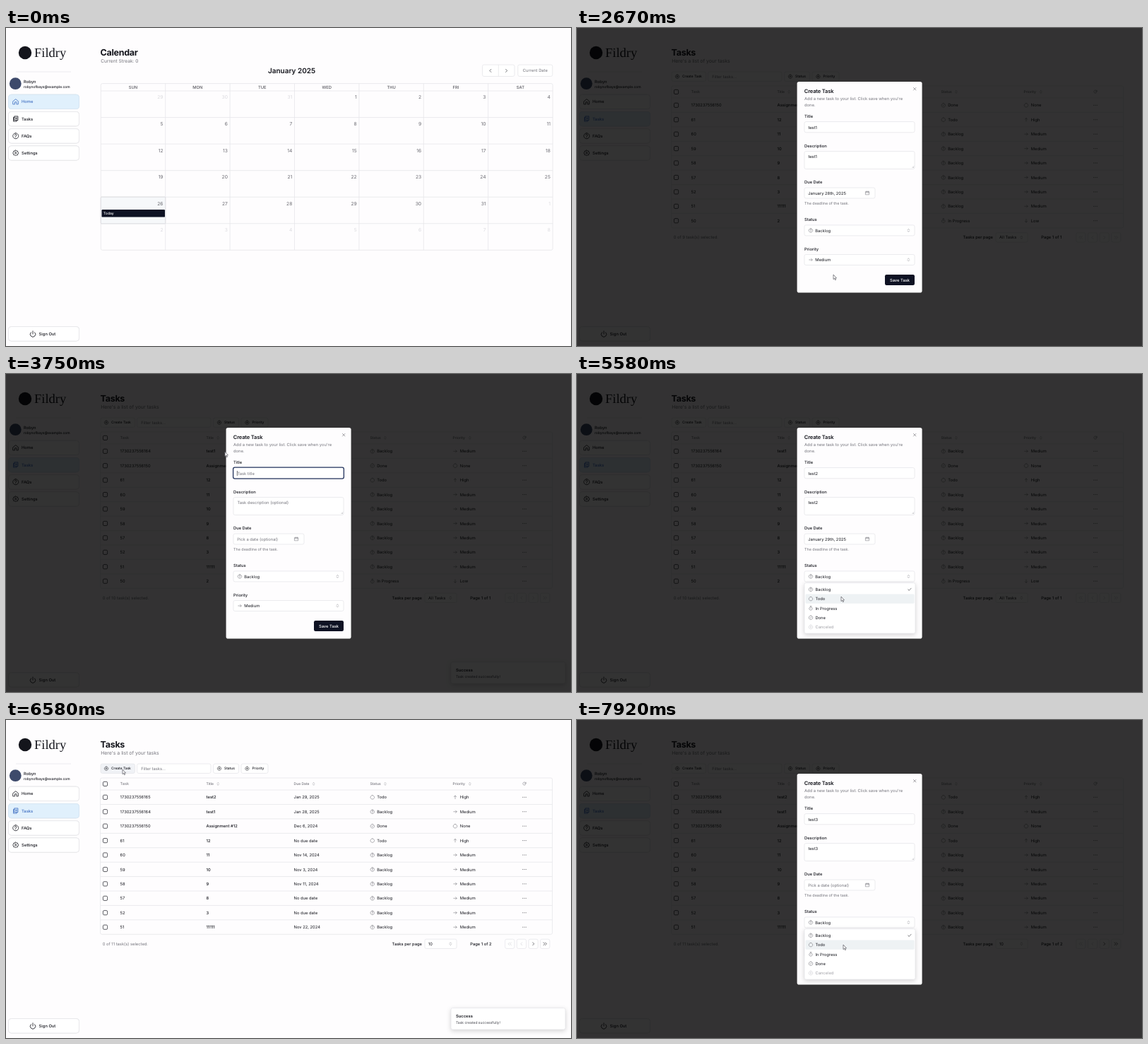
An HTML page that plays this animation: 800 by 450 pixels, repeating every 8 s.

```html
<!DOCTYPE html>
<html lang="en">
<head>
<meta charset="utf-8">
<title>Task manager demo</title>
<style>
html, body { margin: 0; width: 100%; height: 100%; overflow: hidden; background: #fefdfe; }
svg { display: block; width: 800px; height: 450px; font-family: Inter, Arial, sans-serif; text-rendering: geometricPrecision; }
.lift { filter: drop-shadow(0 .6px .7px rgba(0,0,0,.14)); }
.float { filter: drop-shadow(0 2px 3px rgba(0,0,0,.16)); }
</style>
</head>
<body>
<svg id="stage" viewBox="0 0 800 450"></svg>
<script>
const INK = '#14151c', GREY = '#74747c', PALE = '#c9c9ce', LINE = '#e6e6ea', NAVY = '#0e1223', BONE = '#e5e4e7';
const STEP = 1000 / 12, STEPS = 96;
const RING = 'M12 2a10 10 0 1 0 .01 0';
const ICON = {
  home: 'M3 10l9-7 9 7v11h-6v-8H9v8H3z',
  tasks: 'M8 3h12v14H8zM8 7H4v14h12v-4M11 8h6M11 12h6',
  help: RING + 'M9 9a3 3 0 1 1 4 3c-1 .5-1 1-1 2M12 17h.01',
  gear: 'M12 2l3 3h4l1 4 2 3-2 3-1 4h-4l-3 3-3-3H5l-1-4-2-3 2-3 1-4h4zM12 9a3 3 0 1 0 .01 0',
  power: 'M12 2v10M18.4 6.6a9 9 0 1 1-12.8 0',
  plus: RING + 'M8 12h8M12 8v8',
  sort: 'M7 15l5 5 5-5M7 9l5-5 5 5',
  refresh: 'M20 11a8 8 0 1 0-2 6M20 4v7h-7',
  dots: 'M4 12h.01M12 12h.01M20 12h.01',
  date: 'M3 5h18v16H3zM3 10h18M8 2v5M16 2v5',
  close: 'M5 5l14 14M19 5L5 19',
  check: 'M4 12l5 6L20 6',
  prev: 'M15 5l-7 7 7 7', next: 'M9 5l7 7-7 7',
  first: 'M11 5l-7 7 7 7M20 5l-7 7 7 7', last: 'M4 5l7 7-7 7M13 5l7 7-7 7',
  Backlog: RING + 'M9 9a3 3 0 1 1 4 3c-1 .5-1 1-1 2M12 17h.01',
  Todo: RING,
  'In Progress': 'M12 5a8.5 8.5 0 1 0 .01 0M12 14v-4M9 1h6',
  Done: RING + 'M8 12l3 3 5-6',
  Canceled: RING + 'M9 9l6 6M15 9l-6 6',
  None: RING, Low: 'M12 4v16M6 14l6 6 6-6', Medium: 'M4 12h16M14 6l6 6-6 6', High: 'M12 20V4M6 10l6-6 6 6'
};
const STATUSES = ['Backlog', 'Todo', 'In Progress', 'Done', 'Canceled'];
const PRIORITIES = ['None', 'Low', 'Medium', 'High'];
const TASKS = [
  ['1730237556165', 'test2', 'Jan 29, 2025', 'Todo', 'High'],
  ['1730237556164', 'test1', 'Jan 28, 2025', 'Backlog', 'Medium'],
  ['1730237556150', 'Assignment #12', 'Dec 6, 2024', 'Done', 'None'],
  ['61', '12', '', 'Todo', 'High'],
  ['60', '11', 'Nov 14, 2024', 'Backlog', 'Medium'],
  ['59', '10', 'Nov 3, 2024', 'Backlog', 'Medium'],
  ['58', '9', 'Nov 11, 2024', 'Backlog', 'Medium'],
  ['57', '8', '', 'Backlog', 'Medium'],
  ['52', '3', '', 'Backlog', 'Medium'],
  ['51', '11111', 'Nov 22, 2024', 'Backlog', 'Medium'],
  ['50', '2', '', 'In Progress', 'Low']
];
// All times below are in steps of 1/12 s.
const FORMS = [
  { open: 14, title: 15, desc: 20, cal: [29, 32], day: 28, close: 36, text: 'test1' },
  { open: 44, title: 46, desc: 51, cal: [59, 63], day: 29, status: [66, 68], prio: [70, 73], close: 75, text: 'test2' },
  { open: 80, title: 83, desc: 88, status: [94, 99], close: 96, text: 'test3' }
];
const PATH = [
  [4, 20, 220], [6, 45, 145], [7, 42, 126], [9, 60, 126], [13, 160, 68], [14, 361, 100], [23, 361, 100],
  [24, 414, 101], [25, 414, 101], [28, 395, 231], [29, 395, 231], [31, 363, 349], [32, 363, 349], [35, 455, 355],
  [36, 455, 355], [41, 333, 208], [43, 163, 69], [44, 163, 69], [45, 310, 110], [55, 310, 110], [58, 395, 231],
  [59, 395, 231], [62, 378, 349], [63, 378, 349], [65, 420, 284], [66, 420, 284], [67, 374, 315], [68, 374, 315],
  [70, 420, 326], [72, 365, 383], [73, 365, 383], [74, 455, 355], [75, 455, 355], [79, 165, 70], [80, 165, 70],
  [83, 330, 116], [91, 330, 116], [93, 420, 284], [94, 420, 284], [95, 377, 318]
];

const within = (k, span) => span && k >= span[0] && k < span[1];
const loop = (n, fn) => Array.from({ length: n }, (_, i) => fn(i)).join('');

// y is the middle of the capitals
function text(x, y, str, size = 5.8, fill = INK, weight = 400, anchor = 'start', extra = '') {
  return `<text x="${x}" y="${y + size * .364}" font-size="${size}" fill="${fill}" font-weight="${weight}" text-anchor="${anchor}" ${extra}>${str}</text>`;
}
function box(x, y, w, h, fill = 'none', stroke = 'none', r = 2.2, extra = '') {
  return `<rect x="${x}" y="${y}" width="${w}" height="${h}" rx="${r}" fill="${fill}" stroke="${stroke}" stroke-width=".8" ${extra}/>`;
}
function icon(name, x, y, size = 6.7, color = INK, width = 2) {
  const s = size / 24;
  return `<path d="${ICON[name]}" transform="translate(${x - size / 2} ${y - size / 2}) scale(${s})" fill="none" stroke="${color}" stroke-width="${width}" stroke-linecap="round" stroke-linejoin="round"/>`;
}
const line = (x1, y1, x2, y2) => `<path d="M${x1} ${y1}L${x2} ${y2}" stroke="${LINE}" stroke-width=".8"/>`;
const heading = (title, sub, size) =>
  text(133.6, 34.5, title, 12.5, INK, 700, 'start', 'letter-spacing="-.3"') + text(134.2, 46.8, sub, size, GREY);

function sidebar(active) {
  const items = [['Home', 'home'], ['Tasks', 'tasks'], ['FAQs', 'help'], ['Settings', 'gear']];
  return `<circle cx="27" cy="35" r="9.2" fill="${INK}"/>` +
    `<text x="40" y="41" font-size="18.5" fill="${INK}" font-family="Liberation Serif, Times New Roman, serif">Fildry</text>` +
    line(14, 62, 92, 62) + '<circle cx="13.3" cy="78.7" r="8.4" fill="#3d4a6b"/>' +
    text(25, 75.4, 'Robyn', 5.8, INK, 500) + text(25, 83, 'robynofbays@example.com', 4.9, INK, 500) +
    items.map(([label, name], i) => {
      const on = label === active, y = 94.2 + 24.2 * i, color = on ? '#3c6cc0' : INK;
      return box(3.5, y, 100, 20.4, on ? '#e0f0fc' : '#fff', on ? '#d3e6f5' : LINE, 4, 'class="lift"') +
        icon(name, 13.7, y + 10.1, 9.6, color) + text(22, y + 10.1, label, 5.8, color, 500);
    }).join('') +
    box(3.5, 422.6, 100, 20.4, '#fff', LINE, 4, 'class="lift"') +
    icon('power', 38, 433, 10) + text(46.6, 433, 'Sign Out', 5.8, INK, 500);
}

function home() {
  const w = 91.4, h = 37.55, x0 = 134.3, y0 = 89;
  return heading('Calendar', 'Current Streak: 0', 6.6) +
    text(404.5, 60, 'January 2025', 10, INK, 600, 'middle') +
    box(674.5, 52, 45.5, 16.4, '#fff', LINE) + line(697.3, 52, 697.3, 68.4) +
    icon('prev', 686, 60.4, 7) + icon('next', 708.5, 60.4, 7) +
    box(724.8, 52, 49, 16.4, '#fff', LINE) + text(749.3, 60.2, 'Current Date', 5.8, GREY, 400, 'middle') +
    box(x0, 78.6, w * 7, 235.7, 'none', LINE) +
    loop(6, i => line(x0, y0 + h * i, x0 + w * 7, y0 + h * i) + line(x0 + w * (i + 1), 78.6, x0 + w * (i + 1), 314.3)) +
    ['SUN', 'MON', 'TUE', 'WED', 'THU', 'FRI', 'SAT'].map((d, i) => text(x0 + w * (i + .5), 84, d, 5.8, '#55555c', 500, 'middle')).join('') +
    box(x0, y0 + 4 * h, w, h, '#f6f8fa', '#dddde2', 1, 'class="lift"') +
    loop(42, i => {
      const d = i - 2, out = d < 1 || d > 31;
      return text(x0 + w * (i % 7 + 1) - 3.2, y0 + h * Math.floor(i / 7) + 9, (d + 30) % 31 + 1, 6.7, out ? '#dadade' : '#696970', 400, 'end');
    }) +
    box(135.5, 257, 89.5, 10.6, NAVY, 'none', 1.2) + text(138, 262.2, 'Today', 5, '#fff', 500);
}

function skeleton() {
  const bone = (x, y, w, h, r = 2.4) => box(x, y, w, h, BONE, 'none', r);
  const cols = [[153.6, 8.4], [180.6, 21], [293, 21], [413, 21.2], [510, 21], [633, 21.2], [719.6, 8.6]];
  return bone(147, 75, 50, 15) + bone(147, 93.6, 75, 8) +
    [[147, 41.5], [192, 124.5], [320, 42], [365, 42]].map(([x, w]) => bone(x, 111.8, w, 14.8)).join('') +
    box(147, 137, 613, 221.6, 'none', LINE) +
    cols.map(([x, w], i) => bone(x - (i < 2 ? 1.4 : .4), 142, w, 6.8)).join('') +
    loop(10, r => line(147, 154 + r * 20.42, 760, 154 + r * 20.42) +
      cols.map(([x, w]) => bone(x, 160.9 + r * 20.42, w, 6.8)).join('')) +
    bone(147, 372.4, 83, 6.4) +
    [[550, 41.6], [595, 41.6], [648.3, 41.8], [702, 13], [717, 13], [732, 13], [747, 13]].map(([x, w]) => bone(x, 369, w, 13.2)).join('');
}

function table(added, hover) {
  const all = TASKS.slice(2 - added), rows = all.slice(0, 10), many = all.length > 10, h = 20.43;
  const end = 99 + h * rows.length, foot = end + 13.5;
  const button = (x, w, label, fill, tx) => box(x, 62, w, 13.4, fill, LINE, 2.4) +
    icon('plus', tx - 7, 68.6, 6.4) + text(tx, 68.6, label, 4.9, INK, 500);
  const head = (x, label, sx) => text(x, 90.4, label, 5, GREY, 500) + icon('sort', sx, 90.4, 5.6, GREY);
  const tick = y => box(137.4, y - 3.1, 6.2, 6.2, 'none', '#33343c', 1.5);
  return button(134, 48.5, 'Create Task', hover ? '#f0f2f6' : '#fff', 149) +
    box(185.6, 62, 104.4, 13.4, '#fff', LINE) + text(191.2, 68.6, 'Filter tasks...', 5.8, GREY) +
    button(293.6, 36, 'Status', '#fff', 309) + button(333, 38, 'Priority', '#fff', 348.4) +
    box(133.6, 82, 640, end - 82, 'none', LINE) +
    tick(90.4) + text(161.6, 90.4, 'Task', 5.6, GREY) + head(283.6, 'Title', 300.2) +
    head(407.6, 'Due Date', 435.6) + head(515.4, 'Status', 537) + head(632.6, 'Priority', 656.8) + icon('refresh', 734, 90.2, 6.4, GREY) +
    rows.map(([id, title, due, status, prio], i) => {
      const y = 109.3 + h * i;
      return line(133.6, 99 + h * i, 773.6, 99 + h * i) + tick(y) + text(161.6, y, id) + text(283.6, y, title, 5.8, INK, 500) +
        text(407.6, y, due || 'No due date') + icon(status, 518.8, y, 6.7, GREY) + text(525.2, y, status) +
        icon(prio, 636, y, 6.7, GREY) + text(642.8, y, prio) + icon('dots', 734, y, 6.6, INK, 3);
    }).join('') +
    text(136.8, foot, `0 of ${all.length} task(s) selected.`, 5.8, GREY) +
    text(546.6, foot, 'Tasks per page', 5.8, INK, 500) + box(593, foot - 6.7, 45, 13.4, '#fff', LINE) +
    text(598, foot, many ? '10' : 'All Tasks') + icon('sort', 629.4, foot, 5.8, GREY) +
    text(657.2, foot, `Page 1 of ${many ? 2 : 1}`, 5.8, INK, 500) +
    ['first', 'prev', 'next', 'last'].map((name, i) => {
      const x = 713.3 + 16.65 * i;
      return box(x - 6.6, foot - 6.6, 13.2, 13.2, '#fff', LINE) + icon(name, x, foot, 6.8, many && i > 1 ? INK : PALE);
    }).join('');
}

function toast(k) {
  const start = k < 70 ? 40 : 77, leave = k < 70 ? 50 : 87;
  if (k < start || k > leave + 2) return '';
  const dy = [28, 10][k - start] || 0, out = Math.max(0, k - leave + 1) / 3;
  return `<g transform="translate(${out * 60} ${dy})" opacity="${1 - out * .8}">` +
    box(630, 407.6, 162, 30.4, '#fff', LINE, 2.4, 'class="float"') +
    text(637, 418.9, 'Success', 5.8, INK, 600) + text(637, 427.9, 'Task created successfully!', 5, '#44454d') + '</g>';
}

function list(top, items, chosen, cy) {
  const over = Math.floor((cy + 1 - top - 2.5) / 13.3);
  const lit = over >= 0 && over < items.length ? over : items.indexOf(chosen);
  return box(322, top, 157, items.length * 13.3 + 5, '#fff', LINE, 2.2, 'class="float"') +
    items.map((name, i) => {
      const y = top + 9.2 + 13.3 * i, off = name === 'Canceled';
      return (i === lit ? box(323.6, y - 6.6, 154, 13.2, '#eef2f4', 'none', 1.4) : '') +
        icon(name, 331, y, 6.7, off ? PALE : GREY) + text(337.4, y, name, 5.8, off ? '#a3a3a9' : INK) +
        (name === chosen ? icon('check', 471, y, 6.4) : '');
    }).join('');
}

function calendar() {
  const x = i => 334.5 + 15 * i;
  return box(322, 243, 115, 121, '#fff', LINE, 2.2, 'class="float"') +
    text(379.5, 254, 'January 2025', 5.8, INK, 500, 'middle') +
    box(327, 248.4, 11.6, 11.6, '#fff', LINE) + icon('prev', 332.8, 254.2, 6, GREY) +
    box(420.4, 248.4, 11.6, 11.6, '#fff', LINE) + icon('next', 426.2, 254.2, 6, GREY) +
    ['Su', 'Mo', 'Tu', 'We', 'Th', 'Fr', 'Sa'].map((d, i) => text(x(i), 269.5, d, 5.2, GREY, 400, 'middle')).join('') +
    box(327, 345.2, 15, 15, '#eef2f4', 'none') +
    loop(35, i => {
      const d = i - 2;
      return text(x(i % 7), 283 + 17.4 * Math.floor(i / 7), (d + 30) % 31 + 1, 5.8, d < 1 || d > 31 ? '#b5b5bb' : INK, 400, 'middle');
    });
}

function dialog(k, form, cy) {
  const typed = start => form.text.slice(0, Math.max(0, k - start + 1));
  const inDesc = k >= form.desc, busy = Math.min(...[form.cal, form.status].filter(Boolean).map(s => s[0]));
  const day = form.cal && k >= form.cal[1] ? `January ${form.day}th, 2025` : '';
  const status = form.status && k >= form.status[1] ? 'Todo' : 'Backlog';
  const prio = form.prio && k >= form.prio[1] ? 'High' : 'Medium';
  const label = (y, str) => text(322, y, str, 5.8, INK, 500);
  const field = (y, h, value, hint, focus) =>
    box(322, y, 156, h, '#fff', LINE) +
    (focus ? box(321.6, y - .4, 156.8, h + .8, 'none', '#26365f', 2.4, 'style="stroke-width:1.3"') : '') +
    (value ? text(327.4, y + 7.8, value + (focus ? '<tspan font-weight="200">|</tspan>' : '')) : text(327.4, y + 7.8, hint, 5.8, GREY)) +
    (focus && !value ? `<path d="M327.4 ${y + 4.4}v7" stroke="${INK}" stroke-width=".6"/>` : '');
  const select = (y, value) => box(322, y - 7.5, 156, 15, '#fff', LINE) + icon(value, 331, y, 6.7, GREY) +
    text(337.2, y, value) + icon('sort', 469.4, y, 6, GREY);
  return '<rect width="800" height="450" opacity=".8"/>' +
    box(311.6, 76, 177, 298.6, '#fefdfe', 'none', 2.8) +
    text(321.8, 89.7, 'Create Task', 7.5, INK, 600, 'start', 'letter-spacing="-.15"') + icon('close', 478.2, 86.2, 6, '#44454d') +
    text(322, 100.1, 'Add a new task to your list. Click save when you\'re', 5.8, GREY) + text(322, 108.5, 'done.', 5.8, GREY) +
    label(124.7, 'Title') + field(132.6, 15.2, typed(form.title), 'Task title', !inDesc) +
    label(166.4, 'Description') + field(174.5, 25, typed(form.desc), 'Task description (optional)', inDesc && k < busy) +
    `<path d="M474.5 198l2.5-2.5M476 198l1-1" stroke="${GREY}" stroke-width=".4"/>` +
    label(218, 'Due Date') + box(322, 226, 100, 15, '#fff', LINE) +
    text(327.2, 233.5, day || 'Pick a date (optional)', 5.8, day ? INK : GREY) + icon('date', 411.2, 233.4, 6.4, GREY) +
    text(322, 248.2, 'The deadline of the task.', 5.4, GREY) +
    label(271, 'Status') + select(286.4, status) + label(312.6, 'Priority') + select(328, prio) +
    box(436, 349, 42, 15, NAVY, 'none', 2.2) + text(457, 356.4, 'Save Task', 5.8, '#fff', 500, 'middle') +
    (within(k, form.cal) ? calendar() : '') +
    (within(k, form.status) ? list(295.6, STATUSES, status, cy) : '') +
    (within(k, form.prio) ? list(337.4, PRIORITIES, prio, cy) : '');
}

function cursorAt(k) {
  const i = Math.max(1, PATH.findIndex(p => p[0] >= k));
  const [a, ax, ay] = PATH[i - 1], [b, bx, by] = PATH[i], u = (k - a) / (b - a);
  return [ax + (bx - ax) * u, ay + (by - ay) * u];
}
function pointer(x, y, beam) {
  const shape = beam ? 'M-1.5 -3.2h3M0 -3.2v6.4M-1.5 3.2h3' : 'M0 0v6.6l1.5-1.3 1.1 2.4 1-.5-1.1-2.3h2z';
  return `<path d="${shape}" transform="translate(${x} ${y})" fill="#fff" stroke="#55555c" stroke-width=".7"/>`;
}

function draw(k) {
  const form = FORMS.find(f => k >= f.open && k < f.close);
  const [x, y] = cursorAt(k);
  const loading = [[7, 10], [37, 42], [76, 78]].some(s => within(k, s));
  const added = (k >= 42) + (k >= 78);
  const hover = !form && x > 134 && x < 182 && y > 62 && y < 75;
  const page = k < 7 ? home() :
    heading('Tasks', 'Here\'s a list of your tasks', 6.9) + (loading ? skeleton() : table(added, hover));
  return '<rect width="800" height="450" fill="#fefdfe"/>' + sidebar(k < 7 ? 'Home' : 'Tasks') + page + toast(k) +
    (form ? dialog(k, form, y) : '') + (k < 4 ? '' : pointer(x, y, k >= 14 && k < 26));
}

const stage = document.getElementById('stage');
let shown = -1;
function tick() {
  const k = Math.floor((performance.now() + 5) / STEP) % STEPS;
  if (k !== shown) stage.innerHTML = draw(shown = k);
  requestAnimationFrame(tick);
}
tick();
</script>
</body>
</html>
```
